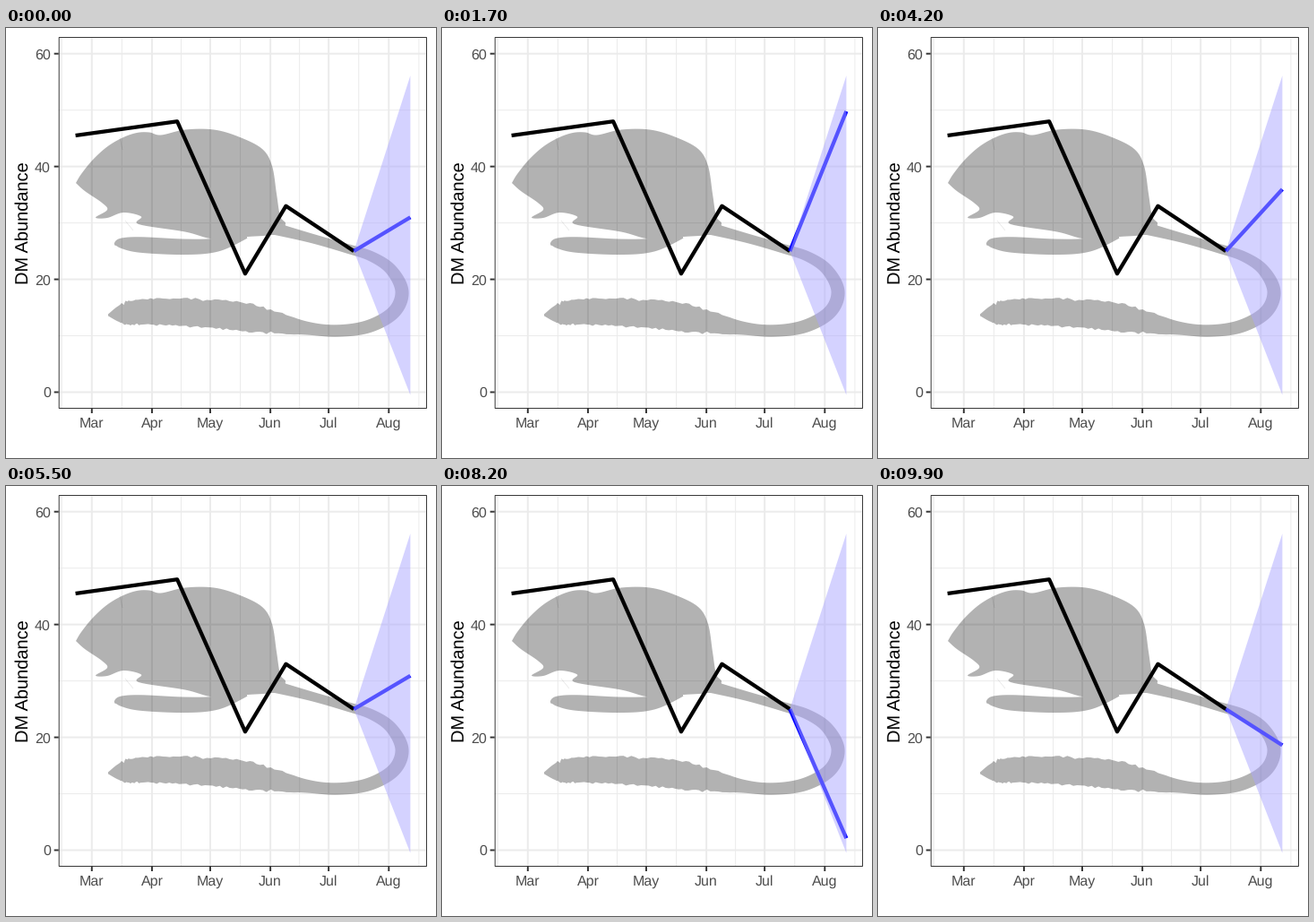
A matplotlib script for the animation above (10 s loop, 480 by 480 pixels).

```python
import matplotlib.pyplot as plt
import numpy as np
from matplotlib.animation import FuncAnimation
from matplotlib.patches import PathPatch, Polygon, Rectangle
from matplotlib.path import Path

FRAMES = 100
LEFT, RIGHT, TOP, BOTTOM = 58.7, 470, 10, 425
GRID, DARK, LABEL = "#ebebeb", "#333333", "#4d4d4d"

# Sampled outcomes for the last date, visited at an even pace
DRAWS = [31, 30.6, 13.7, 48.9, 52.3, 46.6, 24.9, 30, 36, 35.5,
         38.2, 25.1, 19.2, 13.4, 28.2, 12.8, -1.7, 43.2, 14.5, 18.6]

plt.rcParams.update({
    "font.family": "Liberation Sans",
    "path.snap": False,
    "text.hinting": "none",
})


def xpx(day):
    """Days since 1 March to pixels."""
    return 95.8 + 2.1667 * day


def ypx(value):
    return 406.5 - 6.297 * value


def smooth(points, steps=8):
    """Catmull-Rom curve through the points."""
    p = np.array(points, float)
    p = np.vstack([p[0], p, p[-1]])
    t = np.linspace(0, 1, steps, endpoint=False)[:, None]
    parts = [b + (c - a) * t / 2
             + (2 * a - 5 * b + 4 * c - d) * t**2 / 2
             + (3 * b - a - 3 * c + d) * t**3 / 2
             for a, b, c, d in zip(p, p[1:], p[2:], p[3:])]
    return np.vstack(parts + [p[-1:]])


def limb(spine, hair=0):
    """Outline around (x, y, width) points; the far end may be hairy."""
    curve = smooth(spine, 12)
    mid, half = curve[:, :2], curve[:, 2:] / 2
    dx, dy = np.gradient(mid, axis=0).T
    normal = np.column_stack([-dy, dx]) / np.hypot(dx, dy)[:, None]
    rng = np.random.default_rng(4)
    fuzz = hair * np.clip((half - 8) / 4, 0, 1)
    sides = [mid + s * normal * (half + fuzz * rng.normal(size=half.shape))
             for s in (1, -1)]
    return np.vstack([sides[0], sides[1][::-1]])


def union(outlines):
    """One path filling the outlines without doubled overlaps."""
    paths = []
    for pts in outlines:
        x, y = pts.T
        if np.sum(x * np.roll(y, -1) - y * np.roll(x, -1)) < 0:
            pts = pts[::-1]
        paths.append(Path(np.vstack([pts, pts[:1]]), closed=True))
    return Path.make_compound_path(*paths)


def rodent():
    body = smooth([
        (78, 173), (84, 163), (97, 147), (113, 132.5), (130, 122.5), (146, 117),
        (160, 116.5), (173, 119.5), (200, 113.5), (232, 113.5), (260, 121.5),
        (286, 135), (297, 154), (302, 185), (306, 210), (312, 219), (300, 230),
        (270, 233), (232, 235.5), (200, 227.5), (148, 219), (151, 210.5),
        (131, 206), (113, 212), (100, 211.5), (113, 203), (107, 195), (88, 182),
        (78, 173)])
    foot = limb([(268, 231, 8), (236, 242, 15), (200, 244.3, 17.5),
                 (150, 242, 17.5), (128, 240.2, 11), (121, 241.5, 2)])
    tail = limb([(296, 223, 14), (340, 234.5, 10.5), (380, 246, 10.5),
                 (408, 255, 11.5), (430, 270, 13), (442, 294, 15),
                 (433, 317, 15), (405, 333, 14.5), (370, 338, 13.5),
                 (335, 335, 15), (285, 326, 28), (240, 320, 32),
                 (190, 317, 30), (150, 317, 28), (130, 319, 22), (114, 320.5, 2)],
                hair=0.8)
    return union([body, foot, tail])


fig = plt.figure(figsize=(480 / 72, 480 / 72), dpi=72, facecolor="white")
ax = fig.add_axes([0, 0, 1, 1])
ax.set(xlim=(0, 480), ylim=(480, 0))
ax.axis("off")


def line(xs, ys, color, width, z=1):
    return ax.plot(xs, ys, color=color, lw=width, zorder=z,
                   solid_capstyle="butt", solid_joinstyle="round")[0]


def label(x, y, text, size=16, color=LABEL, ha="center", **kw):
    ax.text(x, y, text, size=size, color=color, ha=ha, va="baseline", **kw)


# Minor grid, then major grid with ticks and labels
starts = np.cumsum([0, 31, 30, 31, 30, 31])
for day in [-15.5, *(starts[:-1] + starts[1:]) / 2, starts[-1] + 15.5]:
    line([xpx(day)] * 2, [TOP, BOTTOM], GRID, 0.97)
for v in (10, 30, 50):
    line([LEFT, RIGHT], [ypx(v)] * 2, GRID, 0.97)
for name, day in zip("Mar Apr May Jun Jul Aug".split(), starts):
    x = xpx(day)
    line([x, x], [TOP, BOTTOM], GRID, 1.94)
    line([x, x], [BOTTOM, BOTTOM + 5], DARK, 1.94)
    label(x, 445.6, name)
for v in (0, 20, 40, 60):
    y = ypx(v)
    line([LEFT, RIGHT], [y, y], GRID, 1.94)
    line([LEFT - 5, LEFT], [y, y], DARK, 1.94)
    label(49.8, y + 5.8, str(v), ha="right")
label(24.3, 217.7, "DM Abundance", 20, "black", rotation=90, rotation_mode="anchor")

# Silhouette with faint whiskers
ax.add_patch(PathPatch(rodent(), fc=(0, 0, 0, 0.3), ec="none", zorder=2))
for x, y, dx, dy in ((127, 122, 3, 14), (133, 215, 9, 11)):
    line([x, x + dx], [y, y + dy], (0, 0, 0, 0.1), 0.7, 2)

# Observed series, moving forecast and its interval
now, end = (xpx(135), ypx(25)), xpx(164.1)
line([xpx(d) for d in (-8.4, 44, 79, 100, 135)],
     [ypx(v) for v in (45.5, 48, 21, 33, 25)], "black", 4.27, 3)
forecast = line([now[0], end], [now[1]] * 2, "#0000ff", 4.27, 4)
ax.add_patch(Polygon([now, (end, ypx(56.1)), (end, ypx(-0.5))],
                     fc=(0.67, 0.65, 1, 0.5), ec="none", zorder=5))
ax.add_patch(Rectangle((LEFT + 0.5, TOP + 0.5), RIGHT - LEFT - 1, BOTTOM - TOP - 1,
                       fc="none", ec=DARK, lw=0.97, zorder=6))

stops = np.linspace(0, FRAMES - 1, len(DRAWS))


def update(i):
    forecast.set_ydata([now[1], ypx(np.interp(i, stops, DRAWS))])
    return (forecast,)


anim = FuncAnimation(fig, update, frames=FRAMES, interval=100,
                     repeat=True, repeat_delay=0, blit=False)
plt.show()
```
